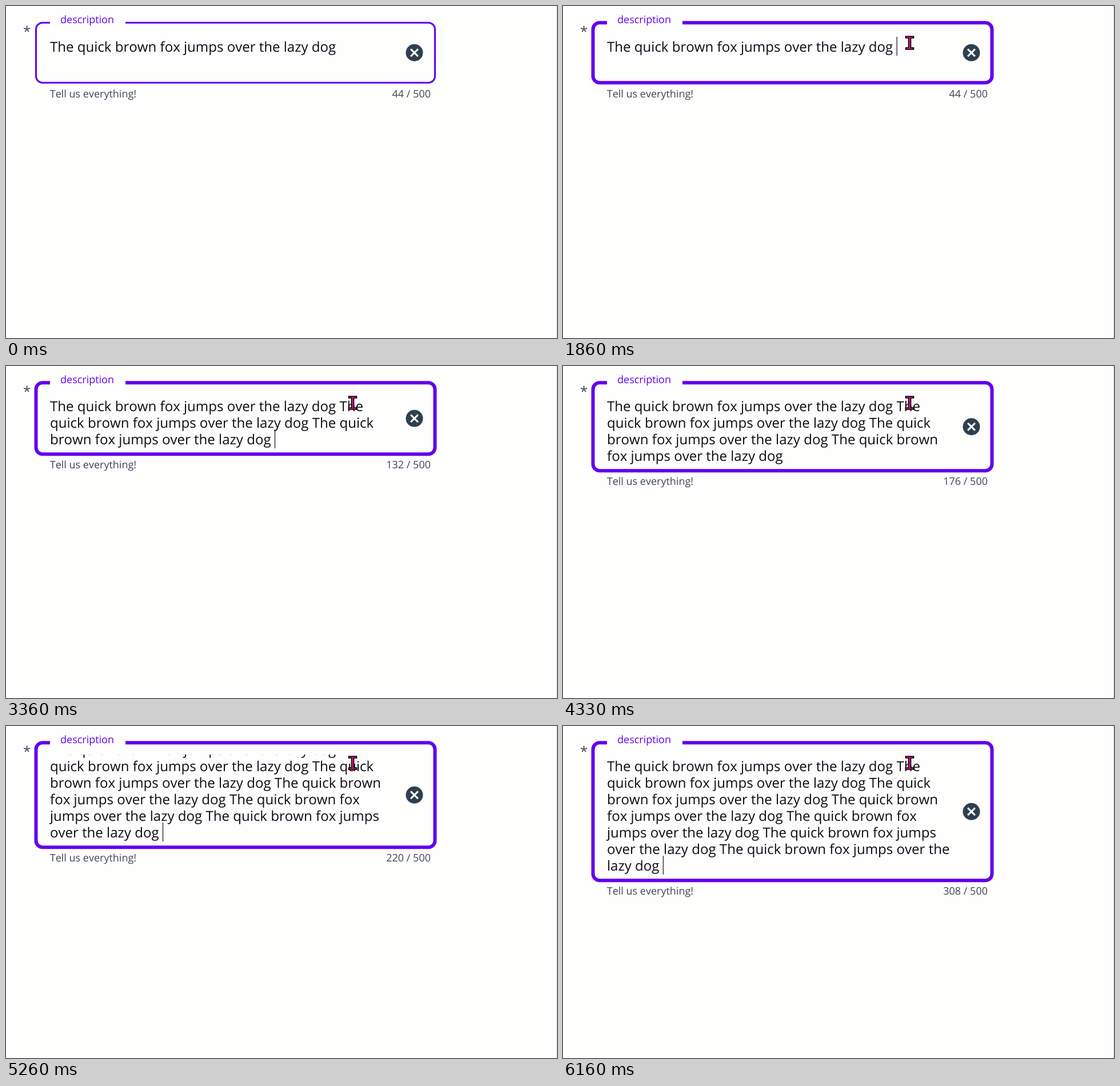
An HTML page that plays this animation: 964x581 px, repeating every 6.23 s.

```html
<!DOCTYPE html>
<html lang="en">
<head>
<meta charset="utf-8">
<title>Growing text field</title>
<style>
  html, body { margin: 0; width: 100%; height: 100%; overflow: hidden; background: #fefefd; }
  svg { display: block; }
  text { font-family: "Open Sans", sans-serif; font-kerning: none; text-rendering: geometricPrecision; white-space: pre; }
  .body { font-size: 24.05px; fill: #0c0c14; }
  .small { font-size: 18px; fill: #3c4654; }
  .label { fill: #6200ee; }
</style>
</head>
<body>
<svg width="964" height="581" viewBox="0 0 964 581">
  <defs>
    <clipPath id="inside"><rect id="clip" x="60" y="50" width="680" height="90"/></clipPath>
  </defs>
  <rect width="964" height="581" fill="#fefefd"/>
  <rect x="963" width="1" height="581" fill="#d9dae0"/>
  <text x="30" y="53" class="body" style="fill:#3c4654">*</text>
  <path id="outline" fill="none" stroke="#6200ee"/>
  <text x="95" y="29.7" class="small label">description</text>
  <g clip-path="url(#inside)">
    <g id="lines"></g>
    <rect id="caret" width="1.3" height="33" fill="#20202a"/>
  </g>
  <g id="clear">
    <circle r="15" fill="#303f4e"/>
    <path d="M-6.4-6.4L6.4 6.4M6.4-6.4L-6.4 6.4" stroke="#fff" stroke-width="3"/>
  </g>
  <text id="hint" x="76.7" class="small">Tell us everything!</text>
  <text id="counter" x="743" class="small" text-anchor="end"></text>
  <g id="pointer" fill="#e0128c" stroke="#000" stroke-width="1.6">
    <path id="beam" d="M-7-11.5H7V-8.5H2V8.5H7V11.5H-7V8.5H-2V-8.5H-7Z"/>
    <path id="arrow" d="M-6-11V10L-1.500 6L2 13L5.500 11.500L2.500 5H9Z"/>
  </g>
</svg>
<script>
const LOOP = 6230;
const ROW = 29;
const LEFT = 77;
const MAX_CHARS = 52;
const SENTENCE = 'The quick brown fox jumps over the lazy dog';

// Each paste updates the text, then the counter, then the field height.
const PASTES = [
  [2400, 2500, 2500], [3160, 3260, 3360], [3860, 3960, 4060],
  [4600, 4660, 4800], [5260, 5360, 5460], [5960, 6060, 6160]
];
const CARET_ON = [
  [1160, 1530], [1860, 2230], [2400, 2700], [3000, 3530],
  [3860, 4330], [4600, 5000], [5260, 5630], [5960, LOOP]
];

const el = id => document.getElementById(id);
const set = (node, attrs) => {
  for (const key in attrs) node.setAttribute(key, attrs[key]);
};
const show = (node, on) => set(node, { visibility: on ? 'visible' : 'hidden' });
const copiesAt = (t, stage) => 1 + PASTES.filter(p => t >= p[stage]).length;

function wrap(copies) {
  const lines = [''];
  for (const word of Array(copies).fill(SENTENCE).join(' ').split(' ')) {
    const last = lines.length - 1;
    if ((lines[last] + word).length > MAX_CHARS) lines.push(word + ' ');
    else lines[last] += word + ' ';
  }
  return lines;
}

const rows = PASTES.concat([0]).map(() => {
  const row = document.createElementNS('http://www.w3.org/2000/svg', 'text');
  set(row, { x: LEFT, class: 'body' });
  return el('lines').appendChild(row);
});

function drawField(bottom, focused) {
  const left = 52.5, right = 750.5, top = 29.3, r = 11.5;
  set(el('outline'), {
    'stroke-width': focused ? 6 : 3,
    d: `M77 ${top}H${left + r}A${r} ${r} 0 0 0 ${left} ${top + r}V${bottom - r}` +
       `A${r} ${r} 0 0 0 ${left + r} ${bottom}H${right - r}` +
       `A${r} ${r} 0 0 0 ${right} ${bottom - r}V${top + r}A${r} ${r} 0 0 0 ${right - r} ${top}H209`
  });
  set(el('clip'), { height: bottom - 53 });
  set(el('clear'), { transform: `translate(714.5 ${(top + bottom) / 2})` });
}

function drawText(t, copies, visibleRows) {
  const lines = wrap(copies);
  const scroll = Math.max(0, lines.length - visibleRows) * ROW;
  const first = (copies > 1 ? 79 : 80) - scroll;
  rows.forEach((row, i) => {
    const content = lines[i] || '';
    if (row.textContent !== content) row.textContent = content;
    set(row, { y: first + i * ROW });
  });
  const last = lines.length - 1;
  set(el('caret'), {
    x: LEFT + rows[last].getComputedTextLength(),
    y: first + last * ROW - 26
  });
  show(el('caret'), CARET_ON.some(([from, to]) => t >= from && t < to));
}

function drawPointer(t) {
  const step = Math.min(8, Math.floor((t - 300) / 45));
  const left = Math.pow(1 - step / 8, 1.6);
  const x = 606.5 + 220 * left, y = 64.5 + 31 * left;
  const overText = x < 692;
  set(el('pointer'), { transform: `translate(${x} ${y})` });
  show(el('beam'), t >= 300 && overText);
  show(el('arrow'), t >= 300 && !overText);
}

function render(t) {
  const grown = copiesAt(t, 2);
  const extra = grown > 2 ? 20 + (grown - 3) * ROW : 0;
  const hintY = 160 + (extra && extra - 1);
  drawField(134.2 + extra, t >= 1160);
  drawText(t, copiesAt(t, 0), Math.max(2, grown));
  set(el('hint'), { y: hintY });
  set(el('counter'), { y: hintY });
  el('counter').textContent = `${44 * copiesAt(t, 1)} / 500`;
  drawPointer(t);
}

const start = performance.now();
function tick() {
  render((performance.now() - start) % LOOP);
  requestAnimationFrame(tick);
}
tick();
</script>
</body>
</html>
```
